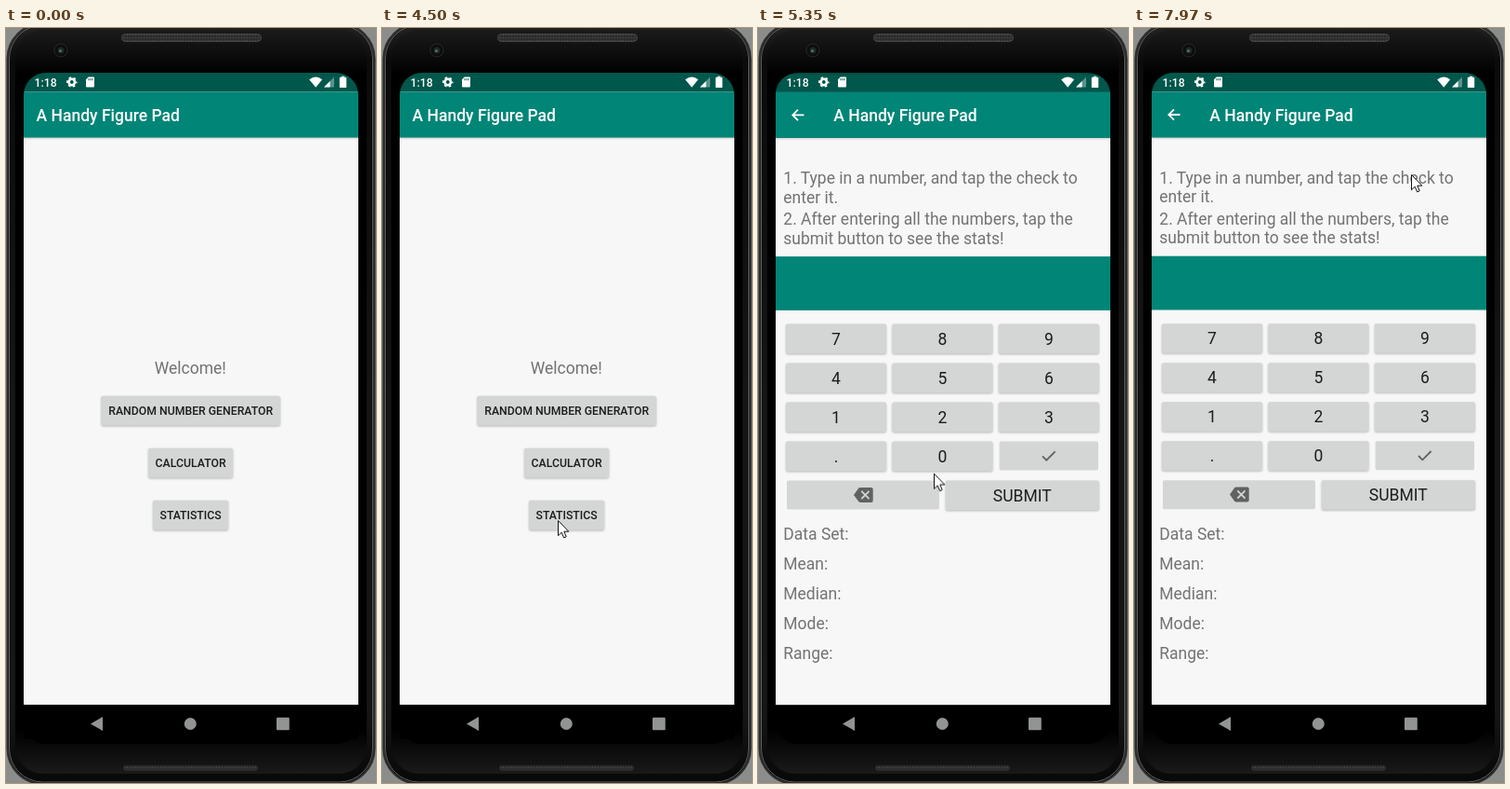
These frames come from a looping animation (398 by 810 pixels, 8000 ms). An HTML page:

```html
<!DOCTYPE html>
<html lang="en">
<head>
<meta charset="utf-8">
<title>Number app</title>
<style>
html, body { margin: 0; width: 100%; height: 100%; overflow: hidden; background: #8b8d8a; }
svg { position: absolute; left: 0; top: 0; display: block; overflow: hidden; }
text { font-family: Roboto, sans-serif; font-size: 17.5px; }
#stage { position: absolute; left: 0; top: 0; width: 398px; height: 810px; overflow: hidden; }
#display { position: absolute; left: 19px; top: 48px; width: 360px; height: 720px; border-radius: 24px; overflow: hidden; background: #000; }
.page { position: absolute; inset: 0; }
.title { font-weight: 500; fill: #fff; }
.note { fill: #737373; }
.label { fill: #1c1c1c; text-anchor: middle; }
.small { font-size: 12.25px; font-weight: 500; }
.btn { fill: #d4d6d5; }
.raised { filter: drop-shadow(0 1px 1px rgba(0,0,0,.26)); }

#home, #stats, #cursor, #halo, #ripple, #press { animation: 8s linear infinite; }
#home { animation-name: leave; }
#stats { animation-name: enter; }
#cursor { animation-name: travel; }
#halo { animation-name: halo; }
#press { animation-name: press; }
#ripple { animation-name: ripple; transform-origin: 190px 529px; }

/* Each window eases in two parts: a quick start, then a long settle. */
@keyframes leave {
  0%, 63.2125% { transform: none; opacity: 1; animation-timing-function: cubic-bezier(.3,0,.8,.15); }
  64.1% { transform: translateY(-5.8px); opacity: .96; animation-timing-function: cubic-bezier(.05,.7,.1,1); }
  68.525%, 100% { transform: translateY(-14.4px); opacity: .9; }
}
@keyframes enter {
  0% { visibility: hidden; transform: translateY(29.5px); clip-path: inset(690px 0 0 0); }
  63.2125% { visibility: visible; transform: translateY(29.5px); clip-path: inset(690px 0 0 0); animation-timing-function: cubic-bezier(.3,0,.8,.15); }
  64.1% { visibility: visible; transform: translateY(17.7px); clip-path: inset(99px 0 0 0); animation-timing-function: cubic-bezier(.05,.7,.1,1); }
  68.525%, 100% { visibility: visible; transform: translateY(0); clip-path: inset(0 0 0 0); }
}
@keyframes travel {
  0%, 3.74% { opacity: 0; transform: translate(295px,797px); }
  3.75% { opacity: 1; transform: translate(295px,797px); animation-timing-function: cubic-bezier(.25,.3,.5,1); }
  10.75%, 13.62% { transform: translate(190px,531px); }
  13.625%, 56.24% { transform: translate(189px,529px); }
  56.25% { transform: translate(189px,528px); }
  61%, 63.1% { transform: translate(189px,517px); }
  64.625% { transform: translate(189px,499px); }
  66.875% { transform: translate(189px,478px); }
  68.75% { transform: translate(186px,425px); }
  70.625% { transform: translate(174px,305px); }
  72.625% { transform: translate(163px,234px); }
  75% { transform: translate(145px,205px); }
  77.5% { transform: translate(122px,181px); }
  81.125% { transform: translate(98px,166px); }
  83% { transform: translate(82px,163px); }
  84.2% { transform: translate(78px,163px); }
  85.5% { transform: translate(84px,163px); }
  90% { transform: translate(165px,160px); }
  93.25% { transform: translate(224px,157px); }
  99.625%, 100% { opacity: 1; transform: translate(298px,157px); }
}
@keyframes halo {
  0%, 35.12% { opacity: 0; }
  35.125%, 36.86% { opacity: 1; }
  36.87%, 100% { opacity: 0; }
}
@keyframes press {
  0%, 36.24% { opacity: 0; }
  36.25%, 39.86% { opacity: 1; }
  39.87%, 100% { opacity: 0; }
}
@keyframes ripple {
  0%, 36.25% { transform: scale(.3); }
  37.5%, 100% { transform: scale(1); }
}
</style>
</head>
<body>
<div id="stage">
  <svg width="398" height="810">
    <defs>
      <linearGradient id="shell" x2="0" y2="1">
        <stop offset="0" stop-color="#242424"/>
        <stop offset=".05" stop-color="#0b0b0b"/>
        <stop offset=".5" stop-color="#151515"/>
        <stop offset=".9" stop-color="#161616"/>
        <stop offset="1" stop-color="#080808"/>
      </linearGradient>
      <linearGradient id="glass" x2="0" y2="1">
        <stop offset="0" stop-color="#1b1b1b"/>
        <stop offset=".06" stop-color="#000"/>
        <stop offset=".94" stop-color="#000"/>
        <stop offset="1" stop-color="#1a1a1a"/>
      </linearGradient>
      <pattern id="mesh" width="3" height="3" patternUnits="userSpaceOnUse">
        <rect width="3" height="3" fill="#2b2b2b"/>
        <circle cx="1.5" cy="1.5" r=".8" fill="#4a4a4a"/>
      </pattern>
    </defs>
    <rect x="1.5" y="-5" width="395" height="816" rx="38" fill="url(#shell)" stroke="#303030" stroke-width="2"/>
    <rect x="3.5" y="-3" width="391" height="812" rx="36" fill="none" stroke="#626262"/>
    <rect x="10" y="2" width="378" height="798" rx="30" fill="url(#glass)"/>
    <rect x="124.5" y="6.5" width="150" height="8" rx="4" fill="url(#mesh)" stroke="#444"/>
    <rect x="126.5" y="791.5" width="144" height="5" rx="2.5" fill="url(#mesh)" stroke="#2c2c2c"/>
    <circle cx="59" cy="24" r="7" fill="#0b0d0d" stroke="#292b2b"/>
    <circle cx="59" cy="24" r="3.5" fill="#1d2928"/>
    <circle cx="58.5" cy="24.5" r="1.5" fill="#527069"/>
  </svg>

  <div id="display">
    <div class="page" id="home">
      <svg viewBox="19 48 360 720" width="360" height="720">
        <g class="chrome"></g>
        <text class="title" x="32.5" y="99.8">A Handy Figure Pad</text>
        <text class="note" x="198.3" y="370.5" text-anchor="middle">Welcome!</text>
        <g class="menu"></g>
        <clipPath id="key"><rect x="158.5" y="507" width="80.5" height="31.5" rx="1.8"/></clipPath>
        <g id="press" clip-path="url(#key)">
          <rect x="158" y="506" width="82" height="34" opacity=".06"/>
          <circle id="ripple" cx="190" cy="529" r="54" opacity=".1"/>
        </g>
      </svg>
    </div>

    <div class="page" id="stats">
      <svg viewBox="19 48 360 720" width="360" height="720">
        <g class="chrome"></g>
        <path d="M49.5 93H37.5M43 87.3L37.3 93l5.7 5.7" fill="none" stroke="#fff" stroke-width="1.8"/>
        <text class="title" x="81.3" y="99.8">A Handy Figure Pad</text>
        <g class="notes"></g>
        <rect x="19" y="244.7" width="360" height="57.8" fill="#008577"/>
        <g class="pad"></g>
        <path d="M306 459l4.3 4.3 9.3-9.3" fill="none" stroke="#606261" stroke-width="1.8"/>
        <path d="M103 500.5l5.2-7.2q.6-.8 1.6-.8h12q1.9 0 1.9 1.9v12.2q0 1.9-1.9 1.9h-12q-1 0-1.6-.8z" fill="#606261"/>
        <path d="M111.3 496.4l8.2 8.2m0-8.2l-8.2 8.2" stroke="#d4d6d5" stroke-width="1.8"/>
      </svg>
    </div>

    <svg viewBox="19 48 360 720" width="360" height="720" fill="#fff">
      <text x="30.5" y="62.8" class="small">1:18</text>
      <circle cx="70.8" cy="58" r="3.2" fill="none" stroke="#fff" stroke-width="2.6"/>
      <circle cx="70.8" cy="58" r="4.9" fill="none" stroke="#fff" stroke-width="1.7" stroke-dasharray="2.6 2.53" stroke-dashoffset="1.3"/>
      <path d="M88.8 52.5h5.2q1 0 1 1v9q0 1-1 1h-7q-1 0-1-1v-7.2z"/>
      <path d="M89 54v2.3m2-2.3v2.3m2-2.3v2.3" stroke="#00574b" stroke-width=".9"/>
      <path d="M326.2 55.3q7-5.8 14 0l-7 8.4z"/>
      <path d="M353 52.5v11h-11z" opacity=".35"/>
      <path d="M348.5 57v6.5H342z"/>
      <path d="M361 52.8v-1h3v1h1.6q.6 0 .6.6v10q0 .6-.6.6h-6.2q-.6 0-.6-.6v-10q0-.6.6-.6z"/>
      <g fill="#929494">
        <path d="M91 746.5l13-7.6v15.2z"/>
        <circle cx="198.3" cy="746.5" r="6.5"/>
        <rect x="291" y="739.8" width="13.8" height="13.4" rx="1"/>
      </g>
    </svg>
  </div>

  <svg width="398" height="810">
    <circle id="halo" cx="189.5" cy="530" r="12" fill="#f0f01e" fill-opacity=".6"/>
    <g id="cursor">
      <path d="M.5 .5v16.2l3.7-3.5 2.4 5.7 2.6-1.1-2.4-5.6h5z" fill="#fff" stroke="#111"/>
    </g>
  </svg>
</div>

<script>
const fill = (selector, html) =>
  document.querySelectorAll(selector).forEach(el => { el.innerHTML = html; });

const box = (x, y, w, h, color) =>
  `<rect x="${x}" y="${y}" width="${w}" height="${h}" fill="${color}"/>`;

// A button centred on (cx, cy); an empty label leaves room for an icon.
const button = (cx, cy, w, label, small) =>
  `<rect class="btn ${label ? 'raised' : ''}" x="${cx - w / 2}" y="${cy - 15.8}" width="${w}" height="${label ? 31.6 : 31}" rx="1.8"/>` +
  `<text class="label ${small ? 'small' : ''}" x="${cx}" y="${cy + (small ? 4.4 : 6.3)}">${label}</text>`;

const note = (label, y) => `<text class="note" x="27.3" y="${y}">${label}</text>`;

const shade = [.16, .09, .04].map((a, i) => box(19, 117 + i, 360, 1, `rgba(0,0,0,${a})`)).join('');

fill('.chrome',
  box(19, 48, 360, 678, '#f7f7f7') + box(19, 48, 360, 20.5, '#00574b') +
  box(19, 68.5, 360, 49, '#008577') + shade + box(19, 726, 360, 42, '#000'));

fill('.menu',
  button(198.7, 410.6, 192.5, 'RANDOM NUMBER GENERATOR', true) +
  button(198.6, 466.6, 91, 'CALCULATOR', true) +
  button(198.6, 522.6, 81, 'STATISTICS', true));

const lines = ['1. Type in a number, and tap the check to', 'enter it.',
  '2. After entering all the numbers, tap the', 'submit button to see the stats!'];
const fields = ['Data Set:', 'Mean:', 'Median:', 'Mode:', 'Range:'];
fill('.notes',
  lines.map((s, i) => note(s, 166.8 + i * 20.5 + (i > 1 ? 3 : 0))).join('') +
  fields.map((s, i) => note(s, 548.8 + i * 32)).join(''));

const keys = ['7', '8', '9', '4', '5', '6', '1', '2', '3', '.', '0', ''];
fill('.pad',
  keys.map((k, i) => button(84 + i % 3 * 114.4, 333 + Math.floor(i / 3) * 42, k ? 108 : 106.5, k)).join('') +
  button(113, 501, 164, '') + button(284.3, 501, 165, 'SUBMIT'));
</script>
</body>
</html>
```
